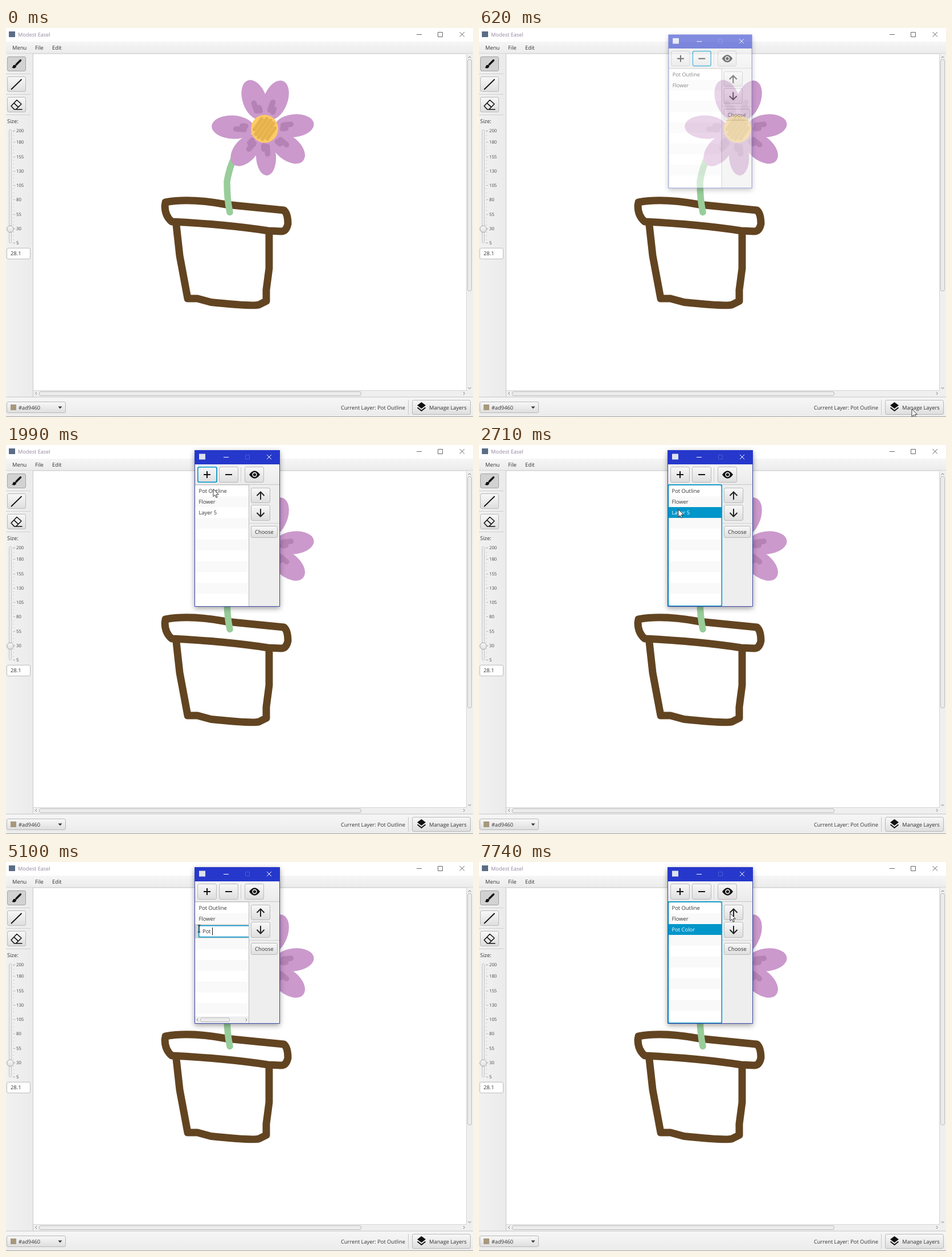
These frames come from a looping animation (820x683 px, 8000 ms). An HTML page:

```html
<!DOCTYPE html>
<html lang="en">
<head>
<meta charset="utf-8">
<title>Modest Easel</title>
<style>
html, body { margin: 0; width: 100%; height: 100%; overflow: hidden; background: #fff; }
svg { display: block; width: 820px; height: 683px; }
text { font-family: "Open Sans", "Noto Sans", sans-serif; white-space: pre; text-rendering: geometricPrecision; }
</style>
</head>
<body>
<svg id="stage" viewBox="0 0 820 683">
  <defs>
    <linearGradient id="button" x2="0" y2="1"><stop stop-color="#f8f8f8"/><stop offset="1" stop-color="#dedede"/></linearGradient>
    <linearGradient id="bar" x2="0" y2="1"><stop stop-color="#f6f6f6"/><stop offset="1" stop-color="#ebebeb"/></linearGradient>
    <linearGradient id="side"><stop stop-color="#f1f1f1"/><stop offset="1" stop-color="#ebebeb"/></linearGradient>
    <filter id="shadow" x="-20%" y="-20%" width="140%" height="140%">
      <feDropShadow dx="0" dy="3" stdDeviation="5" flood-opacity=".38"/>
    </filter>
  </defs>
</svg>
<script>
const LOOP = 8000, BLUE = '#0096c9', INK = '#333';
const stage = document.getElementById('stage');
const $ = id => document.getElementById(id);
const clamp01 = v => Math.min(1, Math.max(0, v));
const easeOut = p => 1 - (1 - p) ** 2;

const rect = (x, y, w, h, fill, extra = '') =>
  `<rect x="${x}" y="${y}" width="${w}" height="${h}" fill="${fill}" ${extra}/>`;
const path = (d, color, width = 1, extra = '') =>
  `<path d="${d}" fill="none" stroke="${color}" stroke-width="${width}" ${extra}/>`;
const shape = (d, fill, extra = '') => `<path d="${d}" fill="${fill}" ${extra}/>`;
const ellipse = (cx, cy, rx, ry, fill, extra = '') =>
  `<ellipse cx="${cx}" cy="${cy}" rx="${rx}" ry="${ry}" fill="${fill}" ${extra}/>`;
const label = (x, y, text, size = 9.4, fill = INK, extra = '') =>
  `<text x="${x}" y="${y}" font-size="${size}" fill="${fill}" ${extra}>${text}</text>`;
const button = (x, y, w, h, fill = 'url(#button)', edge = '#b9b9b9') =>
  rect(x + .5, y + .5, w - 1, h - 1, fill, `rx="2.5" stroke="${edge}"`);
const thumb = (x, y, w, h) => button(x, y, w, h, '#ececec', '#bcbcbc');
const focusRing = (id, x, y, w, h) =>
  rect(x, y, w, h, 'none', `id="${id}" rx="2.5" stroke="${BLUE}" stroke-width="1.6"`);

const ROUND = 'stroke-linecap="round" stroke-linejoin="round"';

// Petals point along +x and are turned around the flower's centre.
function flower() {
  const petals = [
    { angle: -109, reach: 90, half: 21 },
    { angle: -69, reach: 90, half: 21 },
    { angle: 183, reach: 93, half: 20.5 },
    { angle: -6, reach: 87, half: 20 },
    { angle: 39.5, reach: 88, half: 21 },
    { angle: 87, reach: 82, half: 17.5 },
    { angle: 131.6, reach: 83, half: 20 }
  ];
  const turned = (angle, body) => `<g transform="rotate(${angle})">${body}</g>`;
  const leaf = p => turned(p.angle, ellipse(p.reach * .6, 0, p.reach * .4, p.half, '#cb99cc'));
  const mark = p => turned(p.angle,
    path(`M${p.reach * .38} -3H${p.reach * .54}M${p.reach * .36} 3h6`, '#b582b5', 9.5, ROUND));
  let seeds = '';
  for (let y = -14; y <= 14; y += 7) {
    const x = Math.sqrt(18 ** 2 - y * y);
    seeds += `M${-x} ${y}H${x}`;
  }
  return '<g transform="translate(454 177)">' + petals.map(leaf).join('') + petals.map(mark).join('') +
    ellipse(0, 0, 24, 24.5, '#fdca68') + turned(-55, path(seeds, '#e5b24d', 6.4, ROUND)) + '</g>';
}

function painting() {
  const brown = '#624421';
  return path('M280 306Q322 298 387 310L488 320Q495 326 495 344Q492 358 482 357L460 356Q390 345 291 340Q279 330 279 312Z', brown, 13, ROUND) +
    path('M299 346Q302 372 305 400L319 475H336L360 481.5Q432 489 444 486L457 479.5V460L462 422V360', brown, 13, ROUND) +
    path('M434 192Q397 213 388 270Q388 300 393 323.5', '#98cd9a', 11.5, ROUND) + flower();
}

function titleBar() {
  return rect(0, 0, 820, 24, '#fff') + rect(5, 6, 11, 10, '#5b6d86') +
    label(21, 15, 'Modest Easel', 9.2, '#9284a0') +
    path('M721 11.5h9M758.5 7.5h8v8h-8zM796.5 7l8.5 8.5M805 7l-8.5 8.5', '#666');
}

function menuBar() {
  return rect(0, 24, 820, 21, 'url(#bar)') + rect(0, 44.5, 820, 1, '#c4c4c4') +
    label(11, 38, 'Menu') + label(51, 38, 'File') + label(81, 38, 'Edit');
}

function sizeSlider() {
  const tickY = v => 377 - (v - 5) * 1.009;
  let out = label(2, 167, 'Size:') + rect(5.5, 178.5, 4, 199, '#ececec', 'rx="2" stroke="#c6c6c6"');
  for (let v = 5; v <= 205; v += 25) {
    const value = Math.min(v, 200), y = tickY(value);
    out += path(`M12 ${Math.round(y) + .5}h4`, '#aaa') + label(18, y + 3, value, 7.7, '#444');
  }
  for (let v = 11.25; v < 200; v += 6.25) out += path(`M12 ${Math.round(tickY(v)) + .5}h2`, '#ccc');
  return out + ellipse(7.5, 353, 5.8, 5.8, 'url(#button)', 'stroke="#a2a2a2"') +
    button(1, 386, 42, 20, '#fff', '#bdbdbd') + label(8, 399, '28.1');
}

function sidebar() {
  let out = rect(0, 45, 47, 603, 'url(#side)') + rect(47, 45, 1, 603, '#c9c9c9');
  for (let i = 0; i < 3; i++) {
    const y = 50 + 35.5 * i;
    out += i ? button(2, Math.floor(y), 33, 27) : button(2, y, 33, 26, '#d2d2d2', '#a3a3a3');
    out += rect(0, 80 + 36 * i, 43, 1, '#cfcfcf');
  }
  return out + path('M25.5 56.8L18 64.3', '#111', 3.4, 'stroke-linecap="round"') +
    shape('M10 69.5Q12 69 12 67A3.2 3.2 0 0 1 18.2 67.5Q16 72.5 10 69.5Z', '#111') +
    path('M9 108L27.5 90', '#111', 1.8) +
    path('M9 137L19 126.5L27 133.5L17.5 143H14.5ZM14 131.8L21.5 138.8M15 143H28', '#111', 1.6, ROUND) +
    sizeSlider();
}

function scrollBars() {
  return rect(808, 45, 12, 603, '#efefef') + rect(808, 45, 1, 592, '#d5d5d5') +
    rect(48, 636, 772, 12, '#efefef') + rect(48, 636, 761, 1, '#d5d5d5') +
    thumb(810, 55, 8, 407) + thumb(58, 638, 566, 8) +
    path('M811.5 52.5l2.5-2.5 2.5 2.5M811.5 631l2.5 2.5 2.5-2.5M54 639l-2.5 2.5 2.5 2.5M803 639l2.5 2.5-2.5 2.5', '#777');
}

function statusBar() {
  return rect(0, 648, 820, 35, 'url(#bar)') + rect(0, 647.5, 820, 1, '#c6c6c6') + rect(0, 682, 820, 1, '#a5a5a5') +
    button(1, 656, 104, 20) + rect(8.5, 661.5, 9, 9, '#a8987a', 'stroke="#958a76" stroke-width=".7"') +
    label(22, 669.5, '#ad9460', 9.3) + shape('M91.5 664.5h7l-3.5 4z', INK) +
    label(588, 669.5, 'Current Layer: Pot Outline', 9.3) + rect(706, 653, 1, 26, '#c9c9c9') +
    button(713, 653, 103, 26) +
    shape('M729.5 657l7.5 5.5-7.5 5.8-7.5-5.8z', '#111') +
    path('M722.5 666.5l7 5.5 7-5.5', '#111', 1.8) + label(743, 669.5, 'Manage Layers');
}

function dialogHead() {
  return rect(331, 9, 150, 275, '#eee', 'filter="url(#shadow)"') + rect(331, 9, 150, 25, '#2638cb') +
    rect(339, 15.5, 11, 10, '#dde2ee') +
    path('M382 21.5h9M458 17l8 8M466 17l-8 8', '#fff') + path('M420.5 17.5h7v7h-7z', '#4a59d6') +
    rect(332, 34, 148, 35, 'url(#bar)') + rect(332, 69, 148, 1, '#c6c6c6') +
    [336, 374, 419].map(x => button(x, 38, 34, 28)).join('') +
    rect(412, 39, 1, 26, '#d0d0d0') + path('M347 52h12M353 46v12M385 52h12', '#111', 2) +
    shape('M427 52Q436.5 38.5 446 52Q436.5 65.5 427 52Z', '#111') +
    ellipse(436.5, 52, 4.2, 4.2, '#eee') + ellipse(436.5, 52, 2.6, 2.6, '#111') +
    focusRing('plusFocus', 336.8, 38.8, 33.4, 26.4) + focusRing('minusFocus', 374.8, 38.8, 32.4, 26.4);
}

function nameEditor() {
  return '<g id="editor">' + rect(332, 109, 94, 25, '#d4d4d4') +
    path('M426 111.8H338.8V131.7H426', BLUE, 1.8) + rect(339.7, 112.7, 86.3, 18.1, '#fff') +
    rect(344.5, 115, 0, 13.5, BLUE, 'id="highlight"') +
    label(345, 125, '<tspan id="before"></tspan><tspan id="picked" fill="#fff"></tspan><tspan id="after"></tspan>', 9.4, INK, 'id="field"') +
    rect(0, 115, 1, 13.5, '#111', 'id="caret"') +
    rect(332, 271, 94, 12, '#efefef') + thumb(341, 273, 52, 8) +
    path('M337.5 274.5l-2.5 2.5 2.5 2.5M420.5 274.5l2.5 2.5-2.5 2.5', '#777') + '</g>';
}

function dialog() {
  const list = rect(332, 70, 94, 213, '#fff') + '<g id="stripes"></g>' + rect(332, 109, 94, 19, BLUE, 'id="selectedRow"') +
    label(338.5, 84, 'Pot Outline') + label(338.5, 103, 'Flower') + label(338.5, 122, '', 9.4, INK, 'id="newLayer"') +
    nameEditor() + path('M426.5 70V283M332 70H426', '#bcbcbc') + focusRing('listFocus', 332.3, 69.9, 94, 212.8);
  const actions = button(430, 75, 34, 27) + button(430, 105, 34, 28) + rect(427, 137, 53, 1, '#d0d0d0') +
    button(430, 142, 47, 21) +
    path('M447 96V83M440.5 89l6.5-6.5 6.5 6.5M447 112v13M440.5 119l6.5 6.5 6.5-6.5', '#222', 2) +
    label(437, 156, 'Choose');
  return '<g id="dialog">' + dialogHead() + list + actions + path('M331.5 34V283.5H480.5V34', '#3d49a8') + '</g>';
}

stage.insertAdjacentHTML('beforeend',
  rect(0, 0, 820, 683, '#fff') + painting() + titleBar() + menuBar() + sidebar() + scrollBars() + statusBar() + dialog() +
  shape('M0 0V13.3L3.1 10.5L5.1 15.2L7.2 14.3L5.2 9.7H9.4Z', '#fff', 'id="arrow" stroke="#222" stroke-width=".9"') +
  path('M-2.5 -6h5M0 -6V6M-2.5 6h5', '#111', 1.1, 'id="beam"'));

const ENTER = 200, OPEN = 540, ADD_FOCUS = 1440, ADDED = 1520, PICK = 2480, EDIT = 2850;
const WORD = 3300, DESELECT = 3650, DRAG = 3720, DRAG_TIME = 210, COMMIT = 6510, REPICK = 7000;

const moves = [
  { at: ENTER, time: 230, to: [760, 669] },
  { at: 720, time: 680, to: [354, 47] },
  { at: 1840, time: 150, to: [364, 77] },
  { at: 1990, time: 350, to: [350, 113] },
  { at: EDIT, time: 450, to: [379, 122] },
  { at: DESELECT - 150, time: 150, to: [386, 120] },
  { at: DRAG, time: DRAG_TIME, to: [339, 117] },
  { at: 6640, time: 300, to: [346, 117] },
  { at: 7350, time: 390, to: [441, 90] }
];
const bursts = [
  { at: 4660, text: 'Pot ', gap: 145 },
  { at: 5300, text: 'Colo', gap: 95 },
  { at: 5820, text: 'r', gap: 1 }
];

const pointerAt = t => moves.reduce((from, { at, time, to }) => {
  const p = easeOut(clamp01((t - at) / time));
  return from.map((v, i) => v + (to[i] - v) * p);
}, [800, 690]);

// Text, selected range and the moment the caret last restarted its blink.
function fieldAt(t) {
  if (t >= bursts[0].at) {
    let text = '', since = 0;
    for (const b of bursts.filter(b => b.at <= t)) {
      const count = Math.min(b.text.length, 1 + Math.floor((t - b.at) / b.gap));
      text += b.text.slice(0, count);
      since = b.at + (count - 1) * b.gap;
    }
    return { text, from: 0, to: 0, since };
  }
  const text = 'Layer 5';
  if (t < DESELECT) return { text, from: 0, to: t < WORD ? 7 : 6 };
  return { text, from: Math.round(7 * (1 - clamp01((t - DRAG) / DRAG_TIME))), to: 7, since: DESELECT };
}

const show = (id, on) => $(id).setAttribute('display', on ? 'inline' : 'none');

function drawEditor(t) {
  const { text, from, to, since } = fieldAt(t);
  $('before').textContent = text.slice(0, from);
  $('picked').textContent = text.slice(from, to);
  $('after').textContent = text.slice(to);
  const x = n => 345 + (n ? $('field').getSubStringLength(0, n) : 0);
  $('highlight').setAttribute('x', x(from) - .5);
  $('highlight').setAttribute('width', to > from ? x(to) - x(from) + .5 : 0);
  $('caret').setAttribute('x', Math.round(x(text.length)));
  show('caret', from === to && (t - since) % 1000 < 500);
}

function draw(t) {
  const p = clamp01((t - OPEN) / 140);
  const scale = .9 + .1 * easeOut(p);
  $('dialog').setAttribute('opacity', p);
  $('dialog').setAttribute('transform', `translate(406 146) scale(${scale}) translate(-406 -146)`);

  const editing = t >= EDIT && t < COMMIT;
  const rowSelected = (t >= PICK && t < EDIT) || t >= REPICK;
  show('minusFocus', t < ADD_FOCUS);
  show('plusFocus', t >= ADD_FOCUS && t < PICK);
  show('listFocus', t >= PICK && !editing);
  show('selectedRow', rowSelected);
  show('editor', editing);

  let stripes = '';
  for (let row = 1; row < 10; row += 2) {
    stripes += rect(332, 71 + 19 * row + (editing && row > 2 ? 6 : 0), 94, 19, '#f9f9f9');
  }
  $('stripes').innerHTML = stripes;
  $('newLayer').textContent = t < ADDED || editing ? '' : t < EDIT ? 'Layer 5' : 'Pot Color';
  $('newLayer').setAttribute('fill', rowSelected ? '#fff' : INK);
  if (editing) drawEditor(t);

  for (const id of ['arrow', 'beam']) $(id).setAttribute('transform', `translate(${pointerAt(t)})`);
  show('arrow', t >= ENTER && !editing);
  show('beam', editing);
}

function tick() {
  draw(performance.now() % LOOP);
  requestAnimationFrame(tick);
}
tick();
</script>
</body>
</html>
```
